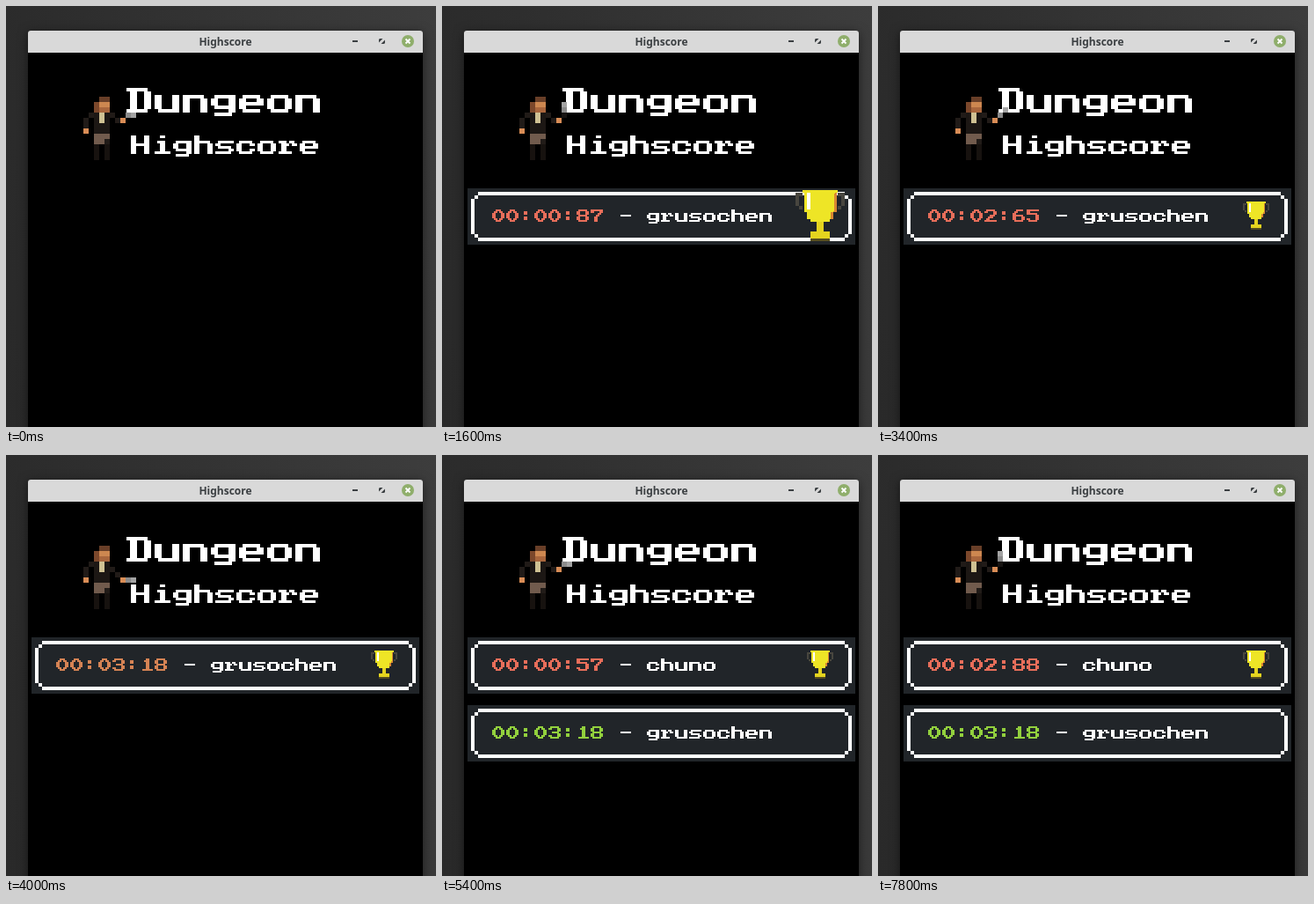
Recreate the animation shown at these times as an HTML page. Size 489 by 478 pixels, loop 8 s.

```html
<!DOCTYPE html>
<html lang="en">
<head>
<meta charset="utf-8">
<title>Highscore</title>
<style>
html, body { margin: 0; width: 100%; height: 100%; overflow: hidden; background: #303030; }
#stage {
  position: absolute; left: 0; top: 0; width: 489px; height: 478px; overflow: hidden;
  background: linear-gradient(80deg, #292929, #2e2e2e 30%, #3d3d3d);
}
#win {
  position: absolute; left: 25px; top: 28px; width: 449px; height: 460px;
  background: #000; border-radius: 3px 3px 0 0; box-shadow: 0 2px 12px rgba(0, 0, 0, .5);
}
#bar {
  height: 25px; border-radius: 3px 3px 0 0; background: #d9d9d9; color: #3b3f42;
  font: 600 12px/26px "Noto Sans", "Open Sans", sans-serif; text-align: center;
}
svg { position: absolute; left: 0; top: 0; }
</style>
</head>
<body>
<div id="stage">
  <div id="win"><div id="bar">Highscore</div></div>
  <svg width="489" height="478" viewBox="0 0 489 478">
    <g>
      <path d="M394 40h6" stroke="#3b3f42" stroke-width="2"/>
      <path d="M425 37h3.5l-4.5 4.5v-3.500zM430 43h-3.500l4.500-4.500v3.500z" fill="#3b3f42" transform="translate(0 0)"/>
      <circle cx="457" cy="40" r="7" fill="#8fae6b"/>
      <path d="M454.500 37.500l5 5m0-5l-5 5" stroke="#fff" stroke-width="1.800"/>
    </g>
    <g shape-rendering="crispEdges">
      <g id="title"></g>
      <g id="hero"></g>
      <g id="knife"></g>
      <g id="rows"></g>
    </g>
  </svg>
</div>
<script>
const LOOP = 8000, STEP = 200;
const RED = [232, 110, 90], GREEN = [146, 208, 61];
const $ = id => document.getElementById(id);

// Letter shapes on a 7-unit grid: [thin bars, double-width stems]
const GLYPHS = {
  D: ['M0 .5h6M0 6.5h6', 'M2 1v5M6 1v5'],
  H: ['M2 3.5h3', 'M1 0v7M6 0v7'],
  c: ['M1 2.5h5M1 6.5h5', 'M1 3v3M6 3v1M6 5v1'],
  e: ['M1 2.5h5M0 4.5h7M1 6.5h5', 'M1 3v3M6 3v1'],
  g: ['M1 2.5h6M1 5.5h5M1 7.5h5', 'M1 3v2M6 3v4'],
  h: ['M2 2.5h4', 'M1 0v7M6 3v4'],
  i: ['M2 2.5h1M1 6.5h6', 'M4 0v1M4 2v4'],
  n: ['M0 2.5h6', 'M1 3v4M6 3v4'],
  o: ['M1 2.5h5M1 6.5h5', 'M1 3v3M6 3v3'],
  r: ['M0 2.5h3M4 2.5h2M1 3.5h3M0 6.5h5', 'M6 3v1M2 4v2'],
  s: ['M1 2.5h6M1 4.5h5M0 6.5h6', 'M1 3v1M6 5v1'],
  u: ['M1 6.5h6', 'M1 2v4M6 2v5'],
  0: ['M2 .5h3M2 6.5h3', 'M2 1v1M5 1v1M1 2v3M6 2v3M2 5v1M5 5v1'],
  1: ['M2 1.5h1M1 6.5h6', 'M4 0v6'],
  2: ['M1 .5h5M3 3.5h3M2 4.5h3M1 5.5h2M0 6.5h7', 'M1 1v1M6 1v2'],
  3: ['M1 .5h5M2 3.5h4M1 6.5h5', 'M1 1v1M6 1v2M6 4v2M1 5v1'],
  4: ['M3 1.5h1M2 2.5h2M1 3.5h2M0 4.5h7', 'M5 0v7'],
  5: ['M0 .5h7M0 2.5h6M1 6.5h5', 'M1 1v1M6 3v3M1 5v1'],
  6: ['M2 .5h4M0 3.5h6M1 6.5h5', 'M2 1v1M1 2v4M6 4v2'],
  7: ['M0 .5h7', 'M1 1v1M6 1v1M5 2v1M4 3v1M3 4v3'],
  8: ['M1 .5h5M1 3.5h5M1 6.5h5', 'M1 1v2M6 1v2M1 4v2M6 4v2'],
  9: ['M1 .5h5M1 3.5h6M1 6.5h4', 'M1 1v2M6 1v4M5 5v1'],
  ':': ['', 'M3 1v2M3 4v2'],
  '-': ['M1 3.5h6', '']
};

// Lettering keeps its words as text beneath the drawn shapes.
function label(str, x, y, unit, color = '#fff') {
  const shapes = [...str].map((ch, i) => {
    const [bars, stems] = GLYPHS[ch] || ['', ''];
    return `<g transform="translate(${i * 8})"><path d="${bars}"/><path d="${stems}" stroke-width="2"/></g>`;
  }).join('');
  return `<g transform="translate(${x} ${y}) scale(${unit})" stroke="${color}" fill="none">` +
    `<text y="7" font-size="8" font-family="DejaVu Sans Mono, monospace" stroke="none">${str}</text>${shapes}</g>`;
}

const rect = (x, y, w, h, fill) => `<rect x="${x}" y="${y}" width="${w}" height="${h}" fill="${fill}"/>`;
const path = (d, fill) => `<path d="${d}" fill="${fill}"/>`;

// Sprite cells are 6 px, counted from the hero's left edge and hair.
const cells = (x, y, w, h, fill) => rect(88 + x * 6, 103 + y * 6, w * 6, h * 6, fill);

const COAT = '#211b18', SKIN = '#d98d56', STEEL = '#8b8b8b', TIP = '#a3a3a3', GRIP = '#171412';

const BODY =
  cells(3, 0, 2, 1, '#693f28') + cells(2, 1, 1, 2, '#7b472b') +
  cells(3, 1, 2, 1, '#cd8750') + cells(3, 2, 2, 1, '#a9663d') +
  cells(1, 3, 1, 1, COAT) + cells(0, 4, 1, 2, COAT) + cells(0, 6, 1, 1, SKIN) +
  cells(2, 3, 3, 4, '#1c1714') + cells(3, 3, 1, 2, '#cfc193') +
  cells(2, 7, 3, 1, '#715b4d') + cells(2, 8, 2, 1, '#715b4d') + cells(4, 8, 1, 1, COAT) +
  cells(2, 9, 1, 3, '#17120f') + cells(4, 9, 1, 3, '#17120f');

const arm = low => low
  ? cells(5, 4, 1, 1, COAT) + cells(6, 5, 1, 1, COAT) + cells(7, 6, 1, 1, SKIN)
  : cells(5, 3, 1, 1, COAT) + cells(6, 4, 1, 1, COAT) + cells(7, 4, 1, 1, SKIN);

// Knife poses: grip cell, direction of the blade, arm lowered
const TOSS = [
  [7, 3, 1, 0, 0],
  [7, 4, 1, -1, 0],
  [9, 0, -1, 0, 0],
  [8, -2, 0, 1, 0],
  [7, -3, 1, 0, 0],
  [8, 3, 0, -1, 1],
  [7, 6, 1, 0, 1],
  [8, 3, 0, -1, 0]
];

function drawHero(t) {
  const clock = t < 4800 ? t : Math.max(4800, t - 400);
  const [x, y, dx, dy, low] = TOSS[Math.floor((clock + 10) / 103.25) % TOSS.length];
  const held = x === 7 && y > 0;
  $('hero').innerHTML = BODY + arm(low);
  $('knife').innerHTML = (held ? '' : cells(x, y, 1, 1, GRIP)) +
    cells(x + dx, y + dy, 1, 1, STEEL) + cells(x + 2 * dx, y + 2 * dy, 1, 1, TIP);
}

function panel(y) {
  return `<g transform="translate(29 ${y})">` + rect(0, 0, 441, 64, '#212529') +
    path('M12 4h417v4H12zM12 56h417v4H12zM4 12h4v40H4zM433 12h4v40h-4z' +
      'M8 8h4v4H8zM429 8h4v4h-4zM8 52h4v4H8zM429 52h4v4h-4z', '#fff') + '</g>';
}

const trophy = scale => `<g transform="translate(430 238) scale(${2 * scale})">` +
  path('M-7.500-7h2v1h-1v3h1v1h-1v-1h-1zM7.500-7h-2v1h1v3h-1v1h1v-1h1z', '#48463f') +
  path('M-5.500-8h11v1h-.5v6h-1v2h-1v1h-6v-1h-1v-2h-1v-6h-.5z', '#eee526') +
  path('M4.500-7h.7v6h-1v2h-1v-2h1z', '#d98632') +
  path('M-4-7h1v5h-1z', '#fff') +
  path('M-1 2h2v3h2v2h-6v-2h2z', '#e5d41f') +
  path('M-3 7h6v.800h-6z', '#554c21') + '</g>';

const CLOCK_A = [[800, .14], [2600, 1.79], [3900, 3.18]];
const CLOCK_B = [[5400, .57], [6400, 1.45], [7800, 2.88]];

function seconds(points, t) {
  const [a, b, c] = points;
  const [p, q] = t < b[0] ? [a, b] : [b, c];
  return p[1] + (q[1] - p[1]) * (t - p[0]) / (q[0] - p[0]);
}

function format(sec) {
  const cs = Math.round(sec * 100), two = n => String(n).padStart(2, '0');
  return [cs / 6000, cs / 100 % 60, cs % 100].map(n => two(Math.floor(n))).join(':');
}

function row(y, time, color, name) {
  return panel(y) + label(time, 57, y + 24, 2, `rgb(${color})`) +
    label('- ' + name, 201, y + 24, 2);
}

function drawRows(t) {
  let out = '';
  if (t >= 5400) {
    out = row(207, format(seconds(CLOCK_B, t)), RED, 'chuno') + trophy(1) +
      row(284, '00:03:18', GREEN, 'grusochen');
  } else if (t >= 800) {
    const k = Math.min(1, Math.max(0, (t - 3870) / 600));
    const color = RED.map((v, i) => Math.round(v + (GREEN[i] - v) * k));
    const pop = Math.min(1, (t - 660) / 1700);
    out = row(207, format(Math.min(3.18, seconds(CLOCK_A, t))), color, 'grusochen') +
      trophy(1 + .85 * Math.sin(Math.PI * pop));
  }
  $('rows').innerHTML = out;
}

$('title').innerHTML = label('Dungeon', 137, 93, 4) + label('Highscore', 142, 147, 3);

const start = performance.now();
let last = -1;
function tick(now) {
  const t = Math.floor(Math.max(0, now - start) % LOOP / STEP) * STEP;
  if (t !== last) {
    last = t;
    drawHero(t);
    drawRows(t);
  }
  requestAnimationFrame(tick);
}
tick(start);
</script>
</body>
</html>
```
